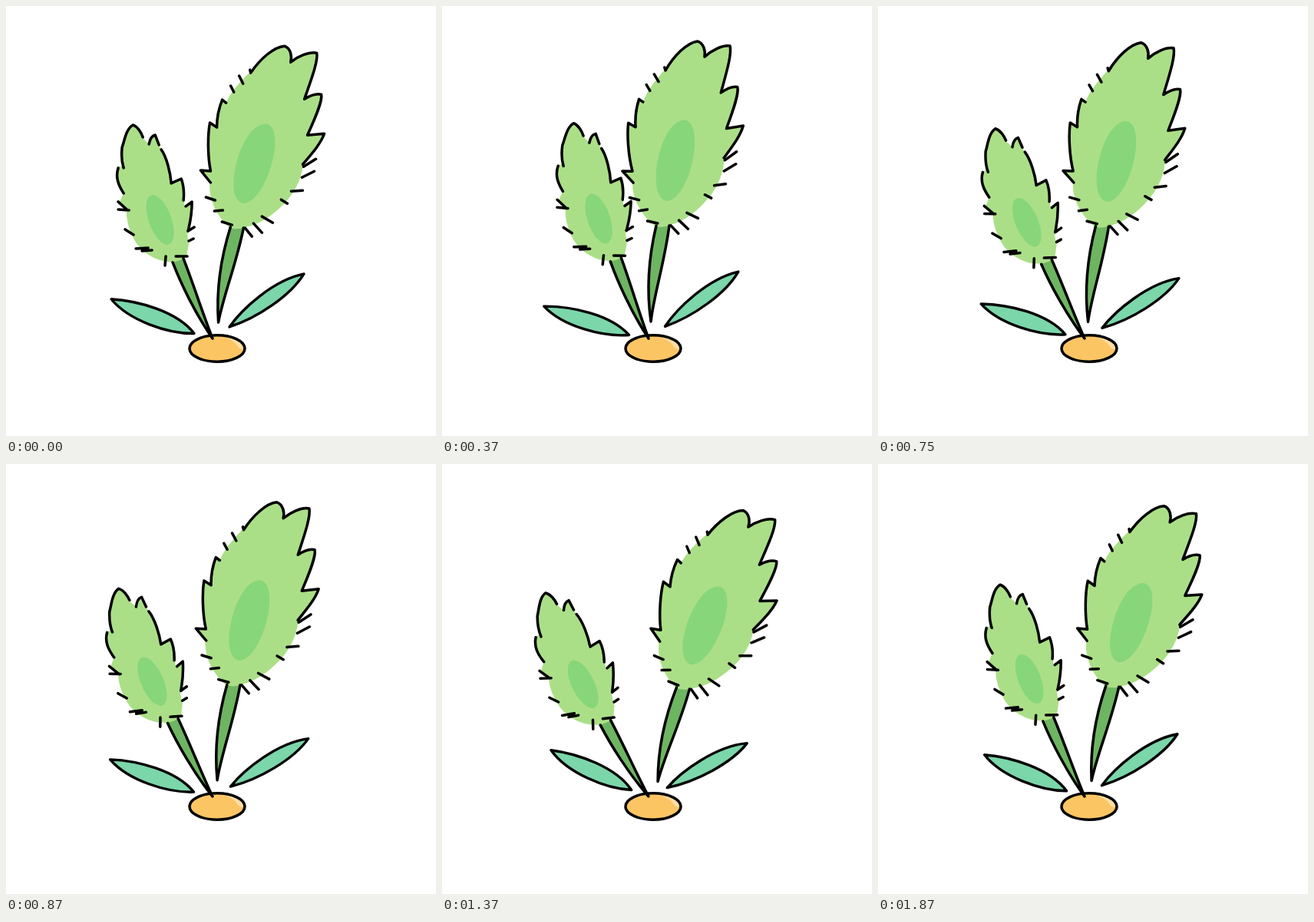
An HTML page for the animation above (2000 ms loop, 560 px wide and 560 px high).

```html
<!DOCTYPE html>
<html lang="en">
<head>
<meta charset="utf-8">
<title>Swaying plant</title>
<style>
  html, body { margin: 0; width: 100%; height: 100%; overflow: hidden; background: #fff; }
  svg { display: block; width: 100vw; height: 100vh; }
  .line { fill: none; stroke: #000; stroke-width: 3.5; stroke-linecap: round; stroke-linejoin: round; }
  .blade { fill: #7bd6aa; stroke: #000; stroke-width: 3.4; stroke-linejoin: round; }
  .head { fill: #abdf87; }
  .core { fill: #88d67a; }
  .stem { fill: #6db560; }
</style>
</head>
<body>
<svg viewBox="0 0 560 560">
  <path id="leftBlade" class="blade" d="M137 382 C172 384 223 398 245 426.500 C211 427 160 410 137 382Z"/>
  <path id="rightBlade" class="blade" d="M291 418 C307 395 348 357 388 349 C371 377 328 406 291 418Z"/>

  <g id="bulb">
    <ellipse cx="275" cy="446" rx="36" ry="17.5" fill="#fcc564"/>
    <path d="M281 429 C297 430 310 436 310 446 C306 448 303 446 301 442 C297 436 290 434 281 429Z" fill="#fddda4"/>
    <ellipse class="line" cx="275" cy="446" rx="36" ry="17.2"/>
  </g>

  <g id="big">
    <path class="stem" d="M292 283 C282 315 274 360 276.500 412 C282 380 301 330 310 283Z"/>
    <path class="head" d="M317 86 C330 69 348 53 362 52 C370 55 372 65 370 73
      C380 65 394 59 404 61 C406 72 396 98 388 121 C396 116 403 113 410 115
      C412 124 400 150 392 168 L414 166 C409 180 396 196 386 209
      C384 228 372 248 360 259 C345 274 328 285 311 288 C304 291 296 291 290 288
      C274 273 263 252 265 230 L253 214 L265 214 C262 195 262 168 265 152
      L274 158 C274 145 277 132 281 122 L286 126 C292 112 304 99 317 86Z"/>
    <path class="core" d="M338 153 C350 155 352 175 348 195 C342 225 326 256 309 257
      C296 255 294 235 297 217 C302 186 318 153 338 153Z"/>
    <path class="line" d="M317 83 L318 87 C330 69 348 53 362 52 C370 55 372 65 370 73
      C380 65 394 59 404 61 C406 72 396 98 388 121 C396 116 403 113 410 115
      C412 124 400 150 392 168 L414 166 C409 180 396 194 386 206"/>
    <path class="line" d="M266 230 L253 214 L266 215 C262 195 262 168 265 152
      L274 158 C274 145 277 132 281 122 L286 126"/>
    <path class="line" d="M292 104 L296 112 M303 91 L308 101 M387 209 L403 199
      M385 223 L401 215 M371 241 L386 240 M358 252 L366 257 M333 274 L347 282
      M322 283 L333 295 M311 289 L320 300 M260 249 L272 253 M271 267 L282 266
      M281 281 L294 285"/>
    <path class="line" d="M292 288 C282 320 273 365 276.500 412 C282 380 300 335 309 289"/>
  </g>

  <g id="small">
    <path class="stem" d="M213 327 C226 360 247 400 269 433 C256 397 243 360 231 325Z"/>
    <path class="head" d="M165 155 C171 157 176 165 178 172 L186 180 C187 174 190 169 194 168
      L199 182 C207 193 213 215 215 231 L228 225 C232 236 232 248 232 260 L242 255
      C242 275 240 288 236 297 L238 310 L235 326 C229 331 220 334 213 333
      C196 333 178 321 169 308 C160 292 156 278 157 265 L148 255 L153 244
      C147 236 143 224 145 211 L151 208 C150 186 155 163 165 155Z"/>
    <ellipse class="core" cx="200.500" cy="278.500" rx="14.700" ry="34" transform="rotate(-20 200.500 278.500)"/>
    <path class="line" d="M153 211 C150 202 150 193 151 184 C154 176 156 160 165 155
      C171 157 176 165 178 171 M186 180 C187 174 190 169 194 168 L199 181
      M202 187 C209 197 214 217 215 231 L228 225 C231 233 232 243 231 253
      M234 261 L242 255 C242 274 239 284 237 293
      M146 211 C142 223 146 233 153 244"/>
    <path class="line" d="M146 255 L158 266 M146 265 L160 266 M155 291 L166 298
      M169 316 L185 315 M177 319 L190 318 M208 326 L207 338 M221 326 L236 326
      M237 293 L245 288 M238 306 L244 303"/>
    <path class="line" d="M217 334 C227 360 246 400 269 433 C256 400 245 365 231 329"/>
  </g>
</svg>
<script>
  const LOOP = 2000, STEPS = 16;
  const el = id => document.getElementById(id);
  const parts = {
    big: [el('big'), 259, 476],
    small: [el('small'), 267, 434],
    leftBlade: [el('leftBlade'), 274, 450],
    rightBlade: [el('rightBlade'), 260, 440]
  };

  // triangle wave: 0, 1, 0, -1 over one loop
  const tri = k => 2 / Math.PI * Math.asin(Math.sin(2 * Math.PI * k / STEPS));

  function turn(name, deg) {
    const [node, x, y] = parts[name];
    node.setAttribute('transform', `rotate(${deg.toFixed(3)} ${x} ${y})`);
  }

  function draw(ms) {
    // steps of 125 ms, cut down to whole hundredths of a second
    const k = Math.floor((Math.floor(ms % LOOP / 10) + 0.5) / 12.5);
    const sway = 0.1 - 5.4 * tri(k);
    const bend = -2.5 + 5.1 * tri(k + 2);
    turn('big', sway);
    turn('leftBlade', sway * 0.95);
    turn('small', bend);
    turn('rightBlade', -bend);
  }

  const start = performance.now();
  function tick() {
    draw(performance.now() - start);
    requestAnimationFrame(tick);
  }
  tick();
</script>
</body>
</html>
```
